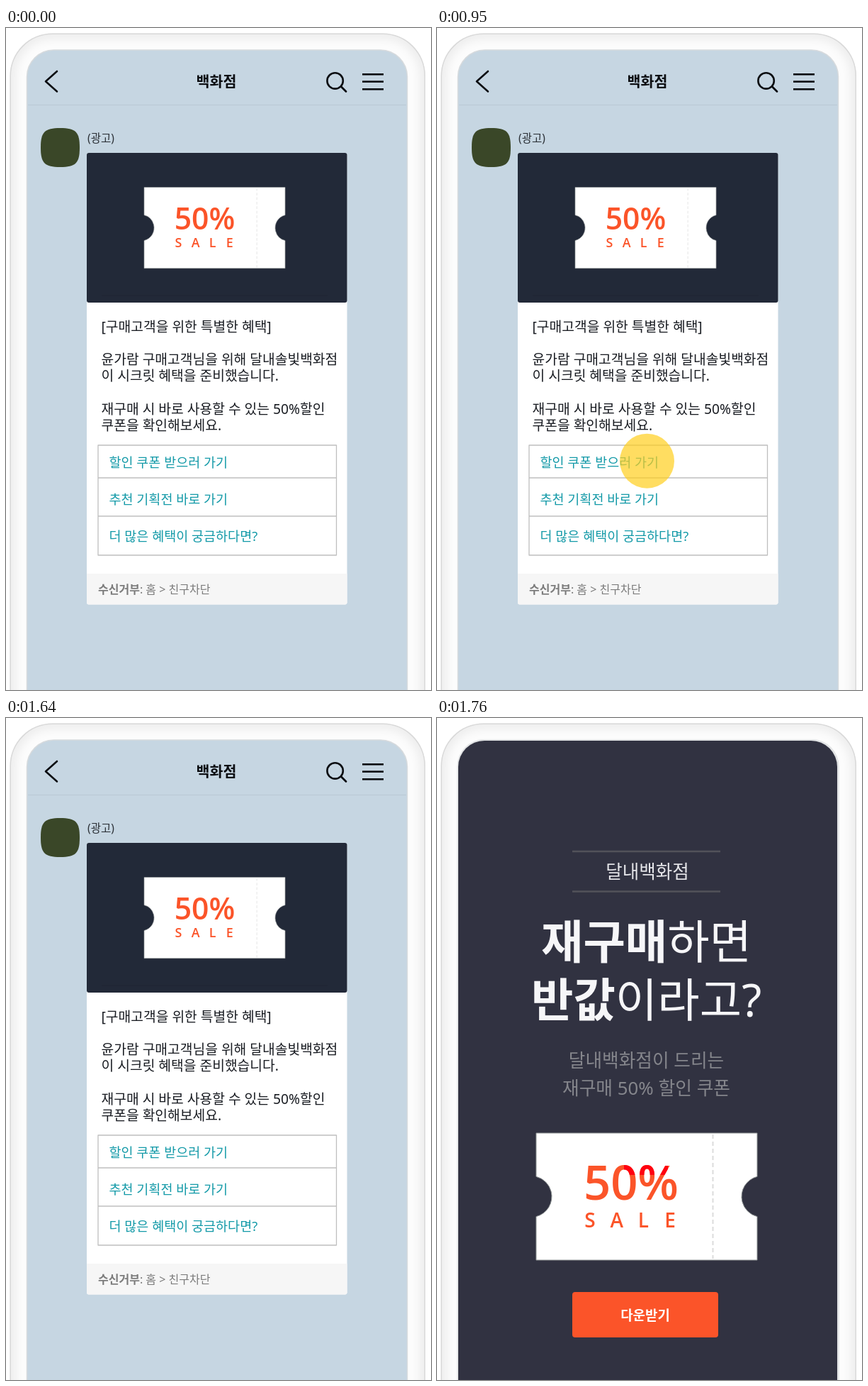
Recreate the animation shown at these times as an HTML page with a canvas. Size 600 px wide and 933 px high, loop 2760 ms.

```html
<!DOCTYPE html>
<html lang="ko">
<head>
<meta charset="utf-8">
<title>쿠폰 메시지</title>
<style>
  html, body { margin: 0; width: 100%; height: 100%; overflow: hidden; background: #fff; }
  canvas { display: block; width: 100vw; height: 100vh; }
</style>
</head>
<body>
<canvas id="stage" width="600" height="933"></canvas>
<script>
const W = 600, H = 933, LOOP = 2760, HOLD = 500, STEP = 30;
const KR = '"Noto Sans", "Noto Sans CJK KR", "Noto Sans CJK", sans-serif';
const LATIN = '"Open Sans", "Noto Sans", sans-serif';
const ORANGE = '#fb5429', NIGHT = '#313241';
const ROWS = [588, 634, 688, 743];

const stage = document.getElementById('stage').getContext('2d');

const clamp = x => Math.min(1, Math.max(0, x));
const span = (t, from, to) => clamp((t - from) / (to - from));
const easeOut = p => 1 - (1 - p) ** 3;
const smooth = p => p * p * (3 - 2 * p);

function box(c, x, y, w, h, r, fill, stroke, width = 1) {
  c.beginPath();
  c.roundRect(x, y, w, h, r);
  if (fill) { c.fillStyle = fill; c.fill(); }
  if (stroke) { c.strokeStyle = stroke; c.lineWidth = width; c.stroke(); }
}

function line(c, points, color, width) {
  c.beginPath();
  points.forEach(([x, y]) => c.lineTo(x, y));
  c.strokeStyle = color;
  c.lineWidth = width;
  c.stroke();
}

// Korean text placed by the middle of its glyphs; returns its width.
function text(c, str, x, midY, size, color, weight = 400, align = 'left') {
  c.font = `${weight} ${size}px ${KR}`;
  c.textAlign = align;
  c.fillStyle = color;
  c.fillText(str, x, midY + size * 0.375);
  return c.measureText(str).width;
}

function boldThenLight(c, bold, light, x, midY, size, color, lightWeight) {
  const w = text(c, bold, x, midY, size, color, 700);
  text(c, light, x + w, midY, size, color, lightWeight);
}

// Square with continuously curved sides.
function squircle(c, x, y, size, color) {
  const half = size / 2, k = size * 0.4;
  c.save();
  c.translate(x + half, y + half);
  c.beginPath();
  c.moveTo(-half, 0);
  c.bezierCurveTo(-half, -k, -k, -half, 0, -half);
  c.bezierCurveTo(k, -half, half, -k, half, 0);
  c.bezierCurveTo(half, k, k, half, 0, half);
  c.bezierCurveTo(-k, half, -half, k, -half, 0);
  c.fillStyle = color;
  c.fill();
  c.restore();
}

function discount(c, color) {
  c.fillStyle = color;
  c.textAlign = 'center';
  c.font = `600 67px ${LATIN}`;
  c.fillText('50%', 134, 94);
}

function ticket(c, x, y, scale, dash) {
  const w = 312, h = 179, r = 29, inset = 7, mid = h / 2;
  const bend = Math.acos(inset / r);
  c.save();
  c.translate(x, y);
  c.scale(scale, scale);

  c.beginPath();
  c.moveTo(0, 0);
  c.lineTo(w, 0);
  c.arc(w + inset, mid, r, Math.PI + bend, Math.PI - bend, true);
  c.lineTo(w, h);
  c.lineTo(0, h);
  c.arc(-inset, mid, r, bend, -bend, true);
  c.closePath();
  c.fillStyle = '#fff';
  c.fill();
  c.strokeStyle = '#8f9494';
  c.lineWidth = 1;
  c.stroke();

  c.setLineDash([6, 4]);
  line(c, [[249.5, 2], [249.5, h - 2]], dash, 2);
  c.setLineDash([]);

  discount(c, ORANGE);
  c.font = `600 28px ${LATIN}`;
  [...'SALE'].forEach((ch, i) => c.fillText(ch, 76 + i * 37.7, 133));
  c.restore();
}

function phone(c) {
  c.fillStyle = '#fff';
  c.fillRect(0, 0, W, H);
  box(c, 5.5, 7.5, 586.5, 1000, 60, '#fcfcfc');
  c.save();
  c.clip();
  c.shadowColor = 'rgba(0,0,0,.32)';
  c.shadowBlur = 16;
  box(c, 5.5, 7.5, 586.5, 1000, 60, null, '#d9d9d9', 3);
  c.restore();
}

function header(c) {
  const ink = '#0c0e12';
  line(c, [[31, 108.5], [565, 108.5]], '#b9c8d4', 1);
  c.lineCap = c.lineJoin = 'round';
  line(c, [[72, 61], [56, 75.3], [72, 89.5]], ink, 2.6);
  c.beginPath();
  c.arc(464.6, 74.4, 11.2, 0, Math.PI * 2);
  c.stroke();
  line(c, [[473, 82.5], [480, 89.5]], ink, 2.8);
  c.lineCap = 'butt';
  for (const y of [65.3, 75.6, 86.3]) line(c, [[503, y], [533, y]], ink, 2.6);
  text(c, '백화점', 297, 75.5, 20.6, ink, 700, 'center');
}

function chat(c, press) {
  box(c, 29.5, 31, 537, 1000, 38, '#c6d6e2', '#d6dadd', 1.5);
  header(c);
  squircle(c, 49, 141, 55, '#3a4728');
  text(c, '(광고)', 115, 155, 15.5, '#2b3036');

  box(c, 114, 176, 367.5, 636.5, 3, '#fff');
  box(c, 114, 176, 367.5, 211, 3, '#222938');
  line(c, [[135, 377], [454, 377]], '#1e2432', 1);
  ticket(c, 195, 224.5, 0.638, '#ececec');

  const body = [
    ['[구매고객을 위한 특별한 혜택]', 420.5],
    ['윤가람 구매고객님을 위해 달내솔빛백화점', 467],
    ['이 시크릿 혜택을 준비했습니다.', 490],
    ['재구매 시 바로 사용할 수 있는 50%할인', 537],
    ['쿠폰을 확인해보세요.', 560]
  ];
  body.forEach(([str, y]) => text(c, str, 134.5, y, 19.25, '#191c22'));

  if (press > 0) {
    c.fillStyle = `rgba(0,0,0,${0.13 * press})`;
    c.fillRect(130, ROWS[0], 337, ROWS[1] - ROWS[0]);
  }
  box(c, 130, ROWS[0], 336.5, ROWS[3] - ROWS[0], 0, null, '#bfbfbf', 1.3);
  for (const y of ROWS.slice(1, 3)) line(c, [[130, y], [466.5, y]], '#bfbfbf', 1.3);
  const links = [
    ['할인 쿠폰 받으러 가기', 612.5],
    ['추천 기획전 바로 가기', 664],
    ['더 많은 혜택이 궁금하다면?', 716]
  ];
  links.forEach(([str, y]) => text(c, str, 145.5, y, 18.5, '#149aa8'));

  box(c, 114, 769, 367.5, 43.5, [0, 0, 3, 3], '#f6f6f6');
  boldThenLight(c, '수신거부', ': 홈 > 친구차단', 130, 790.5, 16, '#7b7b7b', 400);
}

function promo(c) {
  box(c, 28.5, 30, 539, 1000, 38, '#e2e4e5');
  box(c, 30, 32, 535, 1000, 37, NIGHT);
  for (const y of [188, 244.5]) line(c, [[191, y], [400, y]], '#52525a', 2.5);
  text(c, '달내백화점', 297, 216.5, 25.6, '#e6e6ea', 500, 'center');
  boldThenLight(c, '재구매', '하면', 147, 315, 64.6, '#f6f6f8', 300);
  boldThenLight(c, '반값', '이라고?', 133, 397, 64.6, '#f6f6f8', 300);
  text(c, '달내백화점이 드리는', 295.5, 482, 25.7, '#85868c', 500, 'center');
  text(c, '재구매 50% 할인 쿠폰', 295.5, 521, 25.8, '#85868c', 500, 'center');
  ticket(c, 140, 585, 1, '#dcdcdc');

  // Red tint on the tops of the last two glyphs.
  c.save();
  c.beginPath();
  c.rect(264, 628, 62, 16);
  c.clip();
  c.translate(140, 585);
  discount(c, '#ff0010');
  c.restore();

  box(c, 191, 809, 206, 64, 4, ORANGE);
  text(c, '다운받기', 294, 841.5, 18.9, '#fff', 700, 'center');
}

function pointer(c, y, alpha) {
  c.beginPath();
  c.arc(296.5, y, 38.5, 0, Math.PI * 2);
  c.fillStyle = `rgba(255,207,30,${0.7 * alpha})`;
  c.fill();
}

const layer = document.createElement('canvas');
layer.width = W;
layer.height = H;
promo(layer.getContext('2d'));

function draw(time) {
  const t = time < HOLD ? 0 : HOLD + Math.floor((time - HOLD) / STEP) * STEP;
  const enter = easeOut(span(t, 470, 1010));
  const leave = easeOut(span(t, 1265, 1535));
  const press = easeOut(span(t, 1010, 1250)) * (1 - leave);
  const fade = smooth(span(t, 1670, 1760));

  phone(stage);
  chat(stage, press);
  if (enter > 0 && leave < 1) pointer(stage, 732 - 122 * enter, enter * (1 - leave));
  if (fade > 0) {
    stage.globalAlpha = fade;
    stage.drawImage(layer, 0, 0);
    stage.globalAlpha = 1;
  }
}

const start = performance.now();
function tick() {
  draw((performance.now() - start) % LOOP);
  requestAnimationFrame(tick);
}
tick();
</script>
</body>
</html>
```
